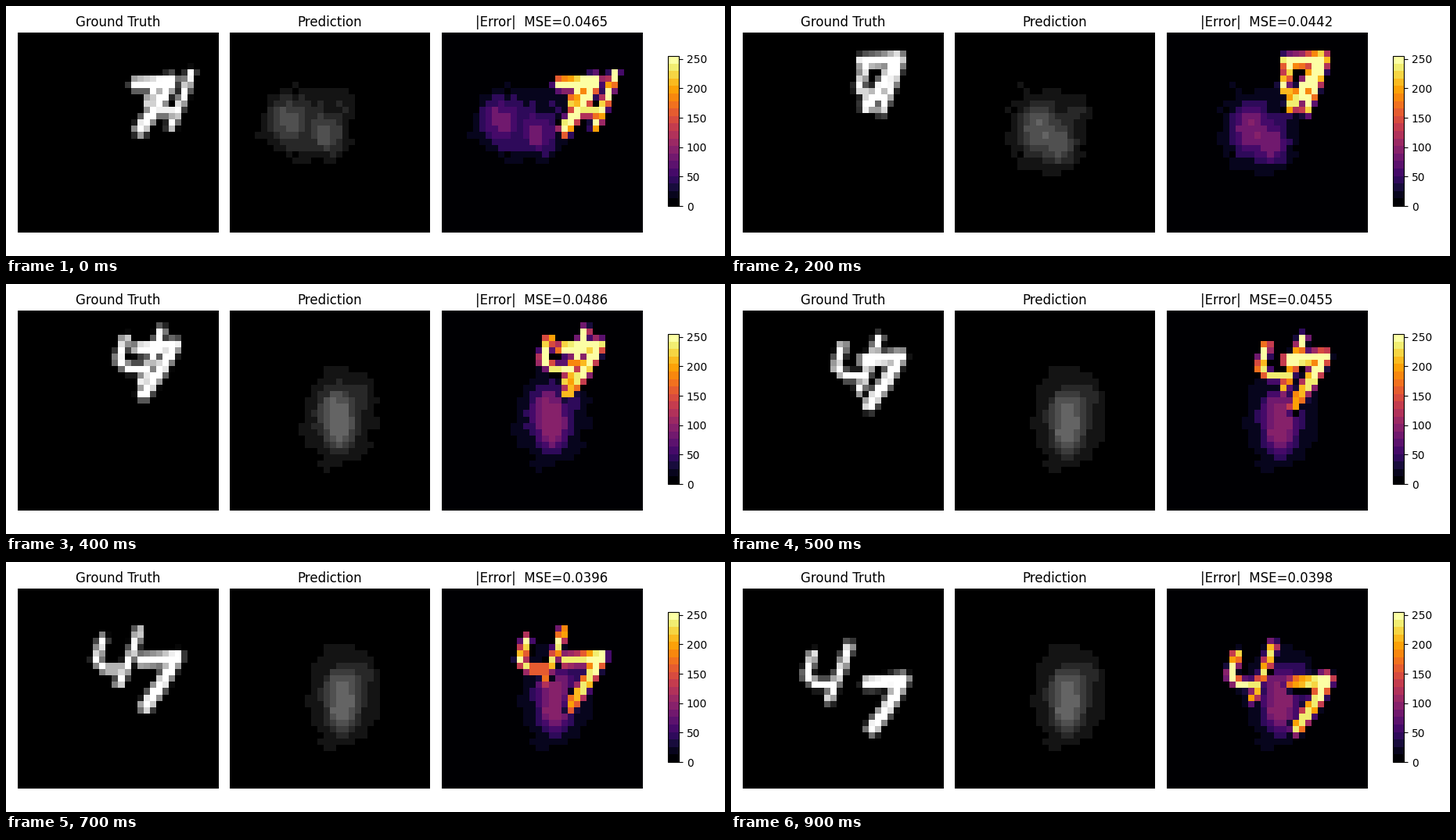
Recreate the animation shown at these times as a matplotlib script. Size 919 by 320 pixels, loop 1000 ms.

```python
import matplotlib.pyplot as plt
import numpy as np
from matplotlib.animation import FuncAnimation

W, H, DPI = 919, 320, 100
GRID, FRAMES, INTERVAL = 32, 10, 100
STEP = 20  # grey level spacing of the prediction
MSE = [0.0465, 0.0479, 0.0442, 0.0464, 0.0486, 0.0455, 0.0423, 0.0396, 0.0370, 0.0398]

# Key points of the strokes in grid cells, placed where each digit ends its path.
SEVEN = [[(19.9, 15.2), (23, 15), (25.5, 14.6), (23.3, 18.6), (20.6, 22.4)]]
FOUR = [[(11.2, 10.6), (10.2, 14), (11.6, 15.4), (14.5, 15.4)],
        [(16.9, 9.3), (15.7, 13), (13.8, 17.7)]]

ys, xs = np.mgrid[0:GRID, 0:GRID] + 0.5
grain = np.random.default_rng(4).normal(0, 3, (GRID, GRID))


def segment_distance(a, b):
    (ax, ay), (bx, by) = a, b
    dx, dy = bx - ax, by - ay
    t = np.clip(((xs - ax) * dx + (ys - ay) * dy) / (dx * dx + dy * dy), 0, 1)
    return np.hypot(xs - ax - t * dx, ys - ay - t * dy)


def digit(strokes, dx, dy, radius):
    dist = np.full((GRID, GRID), float(GRID))
    for stroke in strokes:
        points = [(x + dx, y + dy) for x, y in stroke]
        for a, b in zip(points, points[1:]):
            dist = np.minimum(dist, segment_distance(a, b))
    return 255 * np.clip(radius + 0.5 - dist, 0, 1)


def ground_truth(i):
    # Both digits move at constant speed and bounce off the top edge.
    four = digit(FOUR, 1.18 * (9 - i), 1.2 * (abs(i - 3.4) - 5.6), 0.7)
    seven = digit(SEVEN, 0.12 * (i - 9), 1.8 * (abs(i - 2.6) - 6.4), 1.05)
    return np.maximum(four, seven)


def blob(amplitude, x, y, rx, ry):
    r2 = ((xs - x) / rx) ** 2 + ((ys - y) / ry) ** 2
    return amplitude * np.exp(-r2 ** 1.5)


def prediction(i):
    # Two lobes drift together inside a pale skirt, then rest.
    p = min(i / 4.5, 1)

    def mix(a, b):
        return a + (b - a) * p

    skirt = blob(40, mix(12.3, 18.1), mix(14.8, 17.3), mix(6.2, 5), mix(5.2, 7.3))
    upper = blob(mix(45, 58), mix(9, 18.1), mix(14, 16.6), 2.8, 3.5)
    lower = blob(45, mix(15.8, 17.9), mix(16.6, 20.5), mix(2.6, 2.1), 2.9)
    wisp = blob(20, mix(18.3, 21.8), mix(11.3, 13.5), 1.8, 2.3)
    total = skirt + upper + lower + wisp
    total = total + np.where(total > 1, grain, 0)
    return STEP * np.clip(np.round(total / STEP), 0, 5)


plt.rcParams["font.family"] = "DejaVu Sans"
fig = plt.figure(figsize=(W / DPI, H / DPI), dpi=DPI, facecolor="white")


def pixel_axes(x, y, w, h):
    return fig.add_axes([x / W, 1 - (y + h) / H, w / W, h / H])


def panel(x, width, title, cmap):
    ax = pixel_axes(x, 34, width, 256.3)
    ax.axis("off")
    image = ax.imshow(np.zeros((GRID, GRID)), cmap=cmap, vmin=0, vmax=255,
                      interpolation="nearest", aspect="auto")
    return image, ax.set_title(title, fontsize=12)


truth_image, _ = panel(15, 256.1, "Ground Truth", "gray")
pred_image, _ = panel(286, 255.9, "Prediction", "gray")
error_image, error_title = panel(557, 256.1, "", plt.get_cmap("inferno", 20))
fig.colorbar(error_image, cax=pixel_axes(846.4, 64, 13.8, 192))


def update(i):
    truth, pred = ground_truth(i), prediction(i)
    truth_image.set_data(truth)
    pred_image.set_data(pred)
    error_image.set_data(np.abs(truth - pred))
    error_title.set_text(f"|Error|  MSE={MSE[i]:.4f}")
    return truth_image, pred_image, error_image, error_title


anim = FuncAnimation(fig, update, frames=FRAMES, interval=INTERVAL, repeat=True, repeat_delay=0)
plt.show()
```
